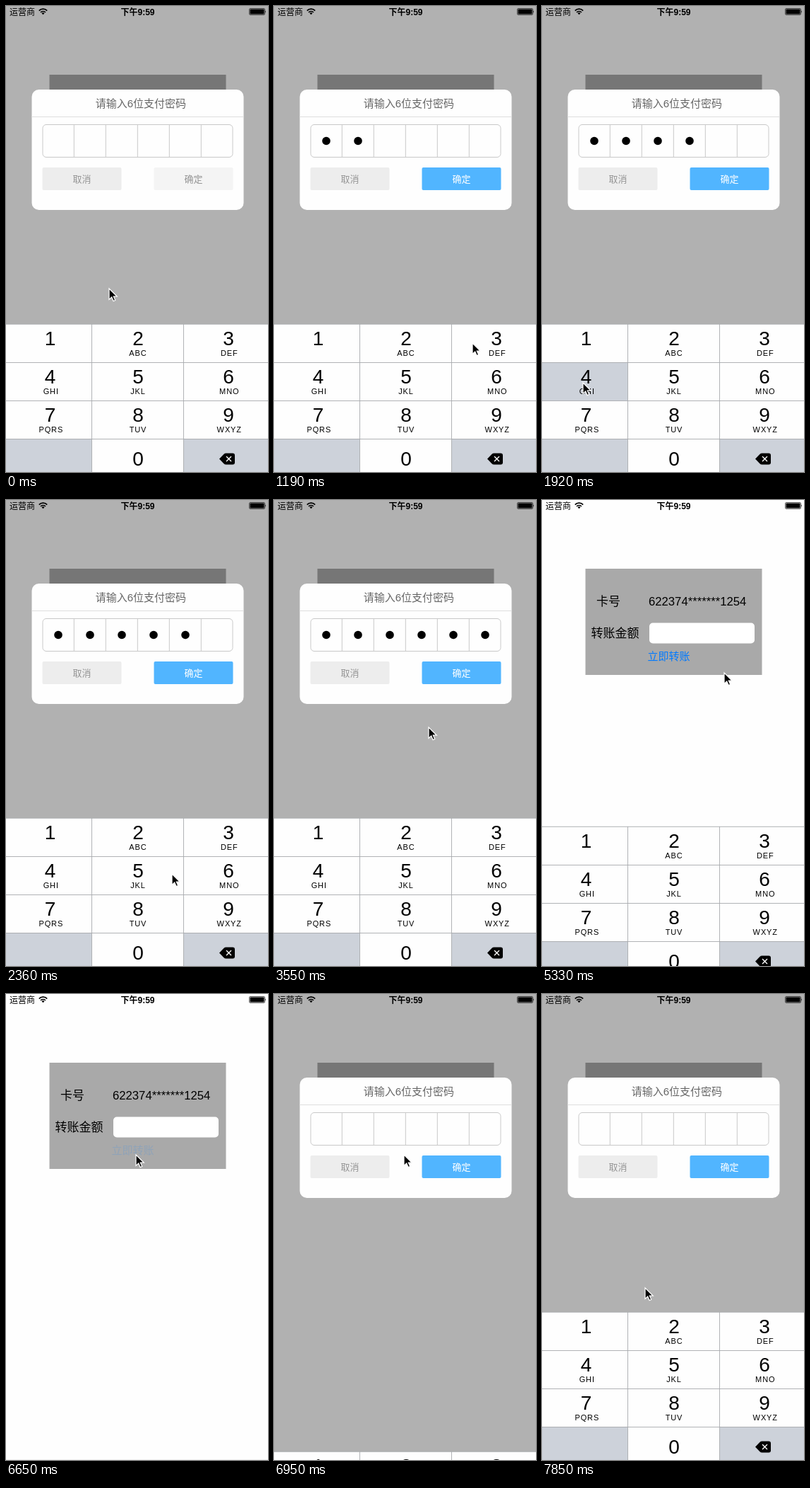
Animation of 371 by 658 pixels, one loop 7990 ms. Source, as an HTML page:

```html
<!DOCTYPE html>
<html lang="zh-CN">
<head>
<meta charset="utf-8">
<title>支付密码</title>
<style>
  html, body { margin: 0; width: 100%; height: 100%; overflow: hidden; background: #fefefe; }
  svg { display: block; width: 371px; height: 658px; }
  text { font-family: "Liberation Sans", "Noto Sans CJK SC", "Noto Sans CJK", sans-serif; font-weight: 300; }
  .mid { text-anchor: middle; }
  .digit { font-size: 28px; }
  .letters { font-size: 11px; letter-spacing: .9px; }
</style>
</head>
<body>
<svg viewBox="0 0 371 658">
  <rect width="371" height="658" fill="#fefefe"/>

  <g id="card">
    <rect x="61.5" y="97" width="250" height="150" fill="#a9a9a9"/>
    <text x="77" y="149" font-size="17">卡号</text>
    <text x="151" y="148.5" font-size="16.7">622374*******1254</text>
    <text x="69.500" y="194" font-size="17">转账金额</text>
    <rect x="152" y="173.500" width="149" height="29" rx="5" fill="#fff"/>
    <text id="transfer" x="149.500" y="225.500" font-size="15">立即转账</text>
  </g>

  <g id="modal">
    <rect width="371" height="658" opacity=".307"/>
    <rect x="36.500" y="118" width="300" height="170" rx="10" fill="#fefefe"/>
    <text class="mid" x="190.800" y="143" font-size="15" fill="#666">请输入6位支付密码</text>
    <path d="M36.500 156.500h300" stroke="#dedede"/>
    <rect x="52" y="167.500" width="269" height="46" rx="5" fill="none" stroke="#c9c9c9"/>
    <path id="dividers" stroke="#c9c9c9"/>
    <g id="dots"></g>
    <rect x="51.500" y="228" width="112" height="32" rx="2" fill="#ededed"/>
    <text class="mid" x="107.500" y="248.800" font-size="13" fill="#949494">取消</text>
    <rect id="okBox" x="209.500" y="228" width="112" height="32" rx="2"/>
    <text id="okText" class="mid" x="265.500" y="248.800" font-size="13">确定</text>
  </g>

  <g>
    <text x="5" y="12.500" font-size="12">运营商</text>
    <g fill="none" stroke="#000" stroke-width="1.700">
      <path d="M46.800 6.600a7.800 7.800 0 0 1 11.400 0M49 9a5 5 0 0 1 7 0"/>
      <path d="M52.500 12.300l-2-2a2.900 2.900 0 0 1 4 0z" fill="#000" stroke="none"/>
    </g>
    <text class="mid" x="186.500" y="12.500" font-size="12" style="font-weight:600">下午9:59</text>
    <rect x="344.500" y="3.500" width="22" height="9" rx="1.500" fill="none" stroke="#000" stroke-width=".6"/>
    <rect x="345.500" y="4.500" width="20" height="7" rx=".6"/>
    <path d="M367.300 6.300q1.500 1.700 0 3.400z"/>
  </g>

  <g id="keyboard">
    <rect y="449" width="371" height="209" fill="#fefefe"/>
    <rect y="611" width="371" height="47" fill="#cdd2da"/>
    <rect x="121.500" y="611" width="130" height="47" fill="#fefefe"/>
    <rect id="pressed" height="54" fill="#cdd2da"/>
    <path d="M0 449.300H371M0 503.500H371M0 557.500H371M0 611.500H371M121.500 449V658M251.500 449V658" stroke="#a9abae" stroke-width=".9"/>
    <g id="keys"></g>
    <path d="M302 639.500L308.500 632.700Q309.800 631.500 311.500 631.500H321Q324 631.500 324 634.500V644.500Q324 647.500 321 647.500H311.500Q309.800 647.500 308.500 646.300Z"/>
    <path d="M312 636l7 7m0-7l-7 7" stroke="#fff" stroke-width="1.400"/>
  </g>

  <path id="cursor" d="M0 0V15.500L3.700 12.100L6.100 17.600L8.700 16.500L6.300 11.200H11.300Z" stroke="#fff" stroke-width="1.200"/>
</svg>
<script>
const LOOP = 7990, TICK = 148;
const CLOSE = 36, OPEN = 47;
const $ = id => document.getElementById(id);
const svgNode = (parent, tag, attrs, text = '') => {
  const node = document.createElementNS('http://www.w3.org/2000/svg', tag);
  for (const name in attrs) node.setAttribute(name, attrs[name]);
  node.textContent = text;
  return parent.appendChild(node);
};

const columns = [0, 121.5, 251.5, 371];
const centers = [62.5, 187, 315];
const letters = ['', 'ABC', 'DEF', 'GHI', 'JKL', 'MNO', 'PQRS', 'TUV', 'WXYZ'];
letters.forEach((label, i) => {
  const x = centers[i % 3], y = 479 + 54 * Math.floor(i / 3);
  svgNode($('keys'), 'text', { class: 'mid digit', x, y }, i + 1);
  svgNode($('keys'), 'text', { class: 'mid letters', x: x + (i % 3 === 1 ? 0 : 1.3), y: y + 15 }, label);
});
svgNode($('keys'), 'text', { class: 'mid digit', x: 187, y: 648.5 }, '0');

const dots = Array.from({ length: 6 }, (_, i) =>
  svgNode($('dots'), 'circle', { cx: 74 + 45 * i, cy: 190.5, r: 5.8 }));
$('dividers').setAttribute('d', Array.from({ length: 5 }, (_, i) => `M${96.3 + 45 * i} 168v45`).join(''));

// Ticks at which digits 1 to 6 are entered
const entries = [4, 6, 9, 13, 15, 18];

// Pointer path: tick, x, y
const path = [
  [0, 146, 399], [1, 108, 475], [2, 66, 536], [3, 46, 495], [4, 47, 478],
  [6, 178, 480], [8, 281, 476], [9, 305, 478], [11, 160, 522], [13, 58, 532],
  [15, 188, 534], [16, 235, 528], [18, 311, 546], [19, 306, 540], [21, 250, 425],
  [23, 203, 338], [24, 219, 321], [27, 243, 278], [30, 258, 244],
  [36, 258, 244], [39, 230, 236], [43, 184, 227], [47, 184, 227],
  [49, 176, 270], [51, 154, 380], [53, 146, 415], [54, 146, 399]
];
const pointerAt = tick => {
  const next = Math.max(1, path.findIndex(p => p[0] >= tick));
  const [a, ax, ay] = path[next - 1], [b, bx, by] = path[next];
  const k = (tick - a) / (b - a);
  return [ax + (bx - ax) * k, ay + (by - ay) * k];
};

const at = (list, i) => list[Math.min(i, list.length - 1)];
const keyboardOffset = tick =>
  tick < CLOSE ? 0 :
  tick < OPEN ? at([12, 150, 200, 209], tick - CLOSE) :
  at([197, 62, 9, 0], tick - OPEN);

function render(ms) {
  const tick = Math.min(53, Math.floor((ms + 10) / TICK));
  const open = tick < CLOSE || tick >= OPEN;
  $('modal').style.display = open ? '' : 'none';
  dots.forEach((dot, i) => {
    dot.style.display = tick >= entries[i] && tick < CLOSE ? '' : 'none';
  });

  const [box, label] = tick < entries[0] ? ['#f4f4f4', '#949494'] :
    tick === 34 || tick === 35 ? ['#d5e0e9', '#dde5eb'] : ['#51b5ff', '#fff'];
  $('okBox').setAttribute('fill', box);
  $('okText').setAttribute('fill', label);
  $('transfer').setAttribute('fill', tick >= 45 ? '#8fa3b8' : '#007aff');

  // Only presses from the third digit on show a key highlight
  const key = entries.indexOf(tick);
  $('pressed').style.display = key >= 2 ? '' : 'none';
  if (key >= 2) {
    const col = key % 3;
    $('pressed').setAttribute('x', columns[col]);
    $('pressed').setAttribute('width', columns[col + 1] - columns[col]);
    $('pressed').setAttribute('y', 449.5 + 54 * Math.floor(key / 3));
  }

  $('keyboard').setAttribute('transform', `translate(0 ${keyboardOffset(tick)})`);
  $('cursor').setAttribute('transform', `translate(${pointerAt(tick)})`);
}

const start = performance.now();
function frame() {
  render((performance.now() - start) % LOOP);
  requestAnimationFrame(frame);
}
frame();
</script>
</body>
</html>
```
